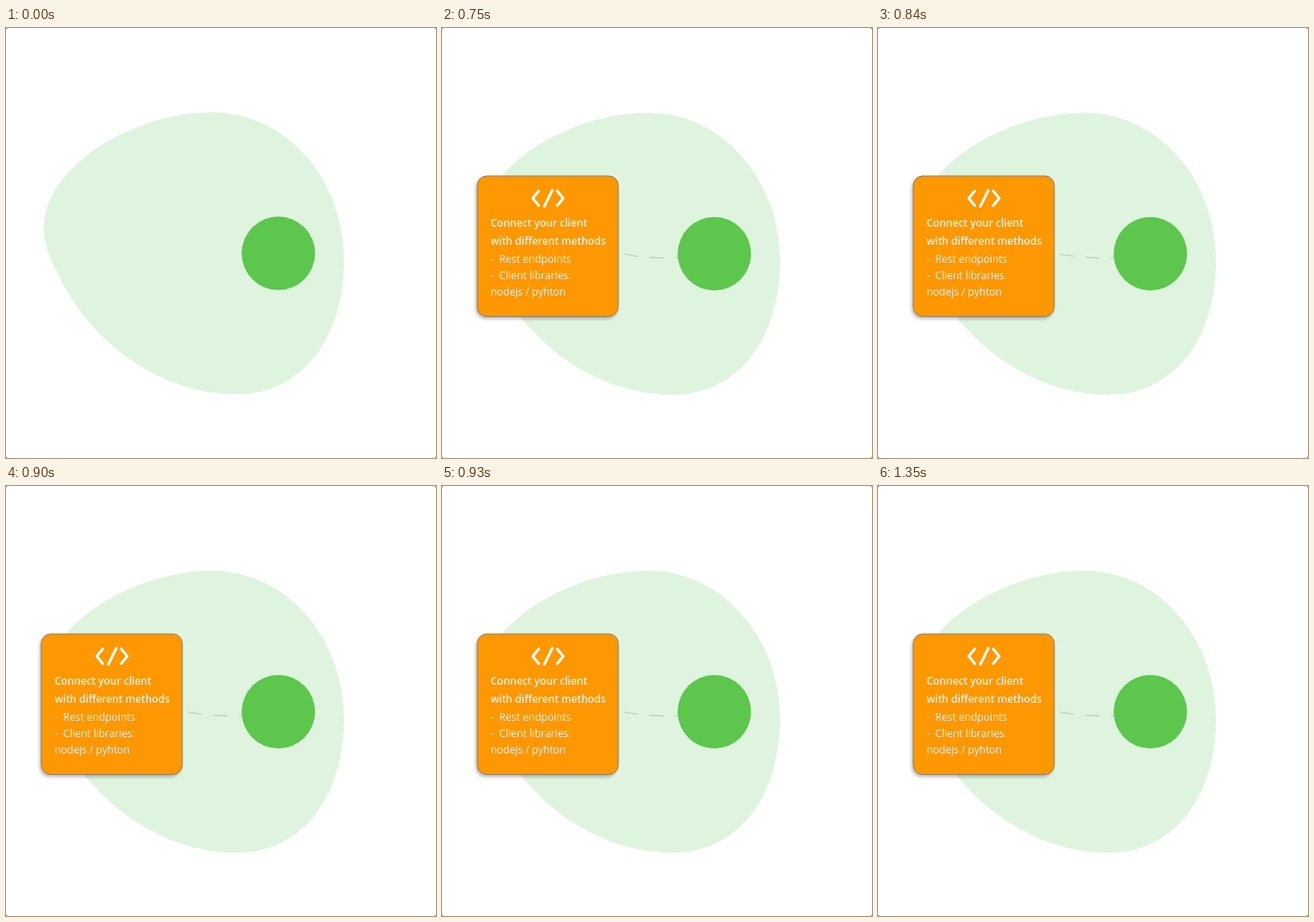
These frames come from a looping animation (500x500 px, 1680 ms). An HTML page:

```html
<!DOCTYPE html>
<html lang="en">
<head>
<meta charset="utf-8">
<title>Connect your client</title>
<style>
  html, body { margin: 0; width: 100%; height: 100%; overflow: hidden; background: #444; }
  svg { display: block; width: 100%; height: 100%; }
  text { font: 12px "Open Sans", "Noto Sans", sans-serif; fill: #f8f5f0; white-space: pre; }
  .bold { font-weight: 600; }
  .icon { fill: none; stroke: #fff; stroke-width: 3; stroke-linecap: round; stroke-linejoin: round; }
</style>
</head>
<body>
<svg viewBox="0 0 500 500">
  <defs>
    <filter id="blur" x="-20%" y="-20%" width="140%" height="140%">
      <feGaussianBlur stdDeviation="2"/>
    </filter>
  </defs>
  <rect width="500" height="500" rx="2" fill="#fff"/>
  <g id="scene">
    <path fill="#dff4de" d="M44 233C44 160 150 98 240 98C325 98 393 175 393 270C393 360 345 426 268 426C185 426 105 372 65 295C52 270 44 252 44 233Z"/>
    <path id="link" fill="none" stroke="#b3cdb3" stroke-width="1.2" stroke-dasharray="17 13" d="M211.5 262.5Q241 268 276 266.5"/>
    <circle cx="316.7" cy="262" r="42.7" fill="#5cc64d"/>
  </g>
  <g id="card">
    <rect x="39.5" y="175" width="163" height="163" rx="11" fill="#000" opacity=".3" filter="url(#blur)"/>
    <rect x="41" y="172" width="164" height="163.5" rx="11" fill="#fd9702" stroke="#8c8078"/>
    <path class="icon" d="M112.5 189.5L105.5 198L112.5 206.5M128.3 188.5L119 207.5M134 189.5L141 198L134 206.5"/>
    <text class="bold" x="56.5" y="231">Connect your client</text>
    <text class="bold" x="56.5" y="252">with different methods</text>
    <text x="56.5" y="273">-  Rest endpoints</text>
    <text x="56.5" y="292">-  Client libraries:</text>
    <text x="56.5" y="311">nodejs / pyhton</text>
  </g>
</svg>
<script>
  const LOOP = 1680, CARD_AT = 720;
  const [scene, link, card] = ["scene", "link", "card"].map(id => document.getElementById(id));

  function draw(now) {
    const open = now % LOOP >= CARD_AT;
    card.style.visibility = link.style.visibility = open ? "visible" : "hidden";
    scene.setAttribute("transform", `translate(0 ${open ? 0.5 : 0})`);
  }

  const start = performance.now();
  function tick() {
    draw(performance.now() - start);
    requestAnimationFrame(tick);
  }
  tick();
</script>
</body>
</html>
```
